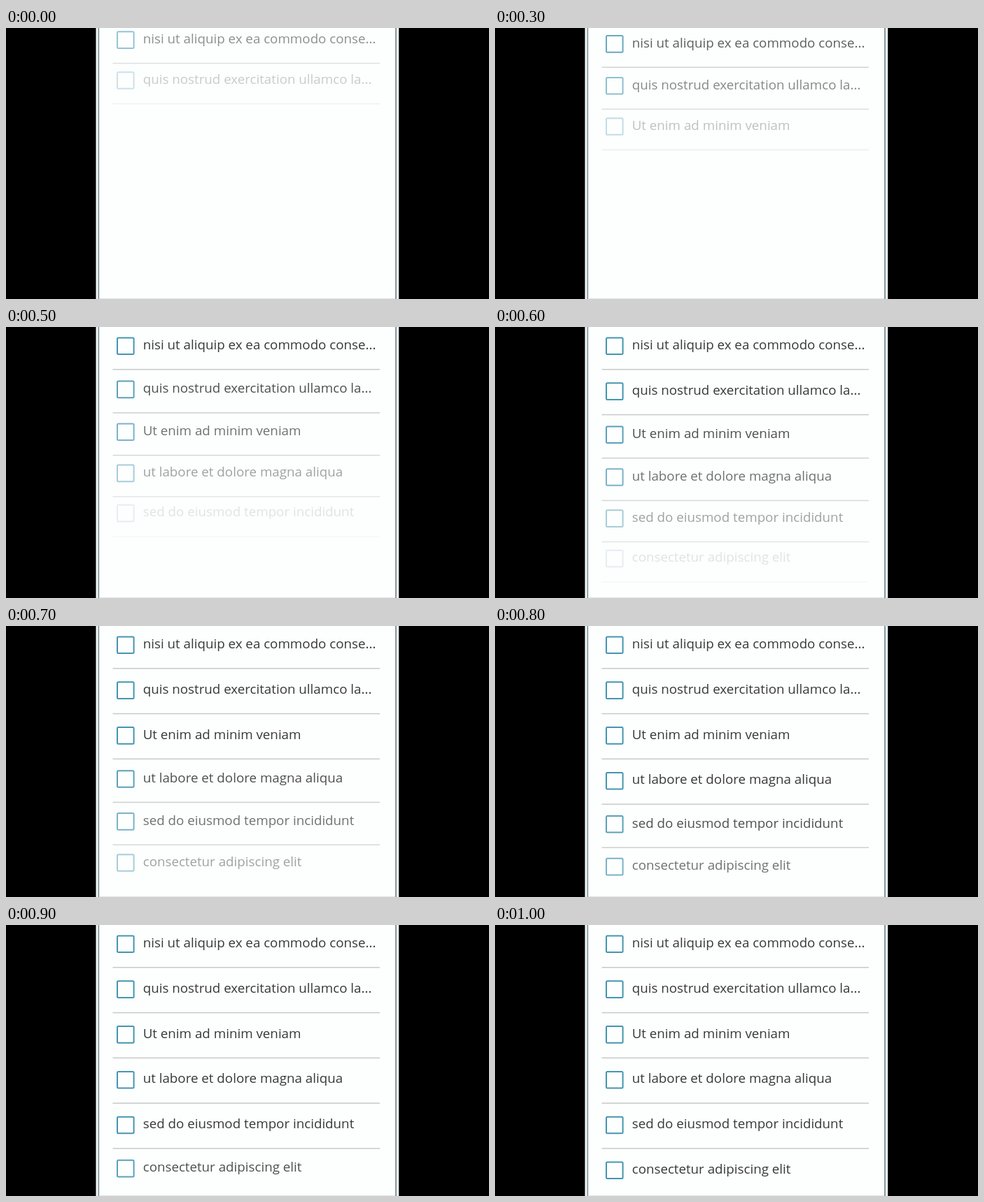
An HTML page with a canvas for the animation above (1.1 s loop, 690 by 388 pixels).

```html
<!DOCTYPE html>
<html lang="en">
<head>
<meta charset="utf-8">
<title>List reveal</title>
<style>
  html, body { margin: 0; width: 100%; height: 100%; overflow: hidden; background: #000; }
  canvas { display: block; }
</style>
</head>
<body>
<canvas id="stage" width="690" height="388"></canvas>
<script>
const ctx = document.getElementById('stage').getContext('2d');
const LOOP = 1100;
const rows = [
  'nisi ut aliquip ex ea commodo conse...',
  'quis nostrud exercitation ullamco la...',
  'Ut enim ad minim veniam',
  'ut labore et dolore magna aliqua',
  'sed do eiusmod tempor incididunt',
  'consectetur adipiscing elit'
];

// Motion is sampled in held steps: two long holds, then every 100 ms.
function clock(ms) {
  if (ms < 300) return -2.65;
  if (ms < 500) return -1.5;
  return Math.floor((ms - 500) / 100);
}

function rect(x, y, w, h, color) {
  ctx.fillStyle = color;
  ctx.fillRect(x, y, w, h);
}

function drawPanel() {
  rect(0, 0, 690, 388, '#000');
  ctx.filter = 'blur(0.5px)';
  rect(128.5, -4, 432.7, 396, '#f6f8f8');
  rect(131.5, -4, 1.9, 396, '#7f959d');
  rect(133.4, -4, 422.7, 396, '#fdfefe');
  rect(556.1, -4, 1.9, 396, '#7f959d');
  ctx.filter = 'none';
  rect(134, 387, 422, 1, '#dfe5e7');
}

function drawRow(text, i, t) {
  const left = 0.15 + 0.2 * i - 0.2 * t;
  if (left >= 1) return;
  const rest = left < 0.16 ? 0 : left * left;
  const y = 27.2 + 64.8 * i - 22 * rest;

  ctx.globalAlpha = 1 - 0.95 * rest;
  ctx.filter = 'blur(0.7px)';
  ctx.strokeStyle = '#4496b0';
  ctx.lineWidth = 2;
  ctx.beginPath();
  ctx.roundRect(159, y - 11.7, 23.6, 23.6, 1.5);
  ctx.stroke();

  ctx.fillStyle = '#383838';
  ctx.fillText(text, 195.7, y + 4.8);
  rect(152.5, y + 32.8, 381.5, 1.5, '#c8caca');
  ctx.filter = 'none';
  ctx.globalAlpha = 1;
}

function play() {
  const t = clock((performance.now() - start) % LOOP);
  drawPanel();
  ctx.font = '18.75px "Open Sans", sans-serif';
  rows.forEach((text, i) => drawRow(text, i, t));
  // The last row has no rule once it settles at the panel's foot.
  rect(134, 366, 422, 21, '#fdfefe');
  requestAnimationFrame(play);
}

const start = performance.now();
play();
</script>
</body>
</html>
```
